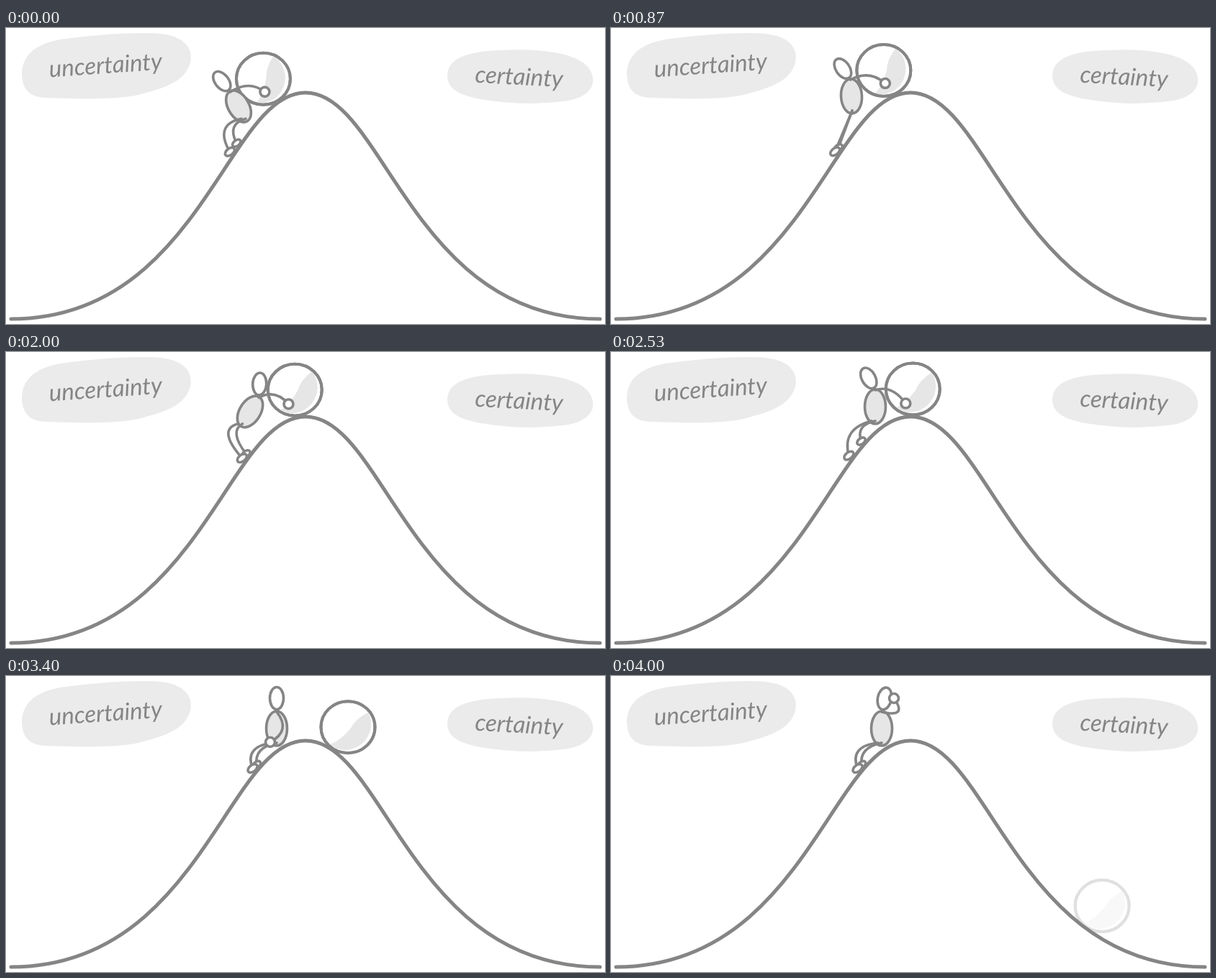
Recreate the animation shown at these times as an HTML page. Size 832 px wide and 412 px high, loop 4.07 s.

```html
<!DOCTYPE html>
<html lang="en">
<head>
<meta charset="utf-8">
<title>Over the hill of uncertainty</title>
<style>
  html, body { margin: 0; width: 100%; height: 100%; overflow: hidden; background: #fff; }
  svg { display: block; width: 832px; height: 412px; }
  text { font: italic 33px Lato, "Open Sans", sans-serif; text-anchor: middle; fill: #858585; }
  .blob { fill: #ebebeb; }
  .line { fill: none; stroke: #858585; stroke-linecap: round; stroke-linejoin: round; }
</style>
</head>
<body>
<svg viewBox="0 0 832 412">
  <path class="blob" d="M22 65C22 40 38 23 75 16C120 10 175 5 215 8C250 12 260 30 256 48C250 72 225 82 195 90C160 102 90 98 55 97C32 96 23 85 22 65Z"/>
  <path class="blob" d="M613 66C614 42 640 32 690 31C730 28 790 32 809 55C823 75 814 94 782 101C745 106 715 106 680 102C640 97 613 90 613 66Z"/>
  <text transform="translate(139 63) rotate(-4)">uncertainty</text>
  <text transform="translate(712 79) rotate(3)">certainty</text>
  <g id="ball" class="line" stroke-width="4"></g>
  <path class="line" stroke-width="5" d="M7 405C269 405 307 90 416 90S563 405 825 405"/>
  <g id="man" class="line" stroke-width="3.6"></g>
</svg>
<script>
const LOOP = 4070, STEP = 66.67, LAST = 60;
const ball = document.getElementById('ball'), man = document.getElementById('man');

// Steps during which the pose is reached, then:
// body x, y, lean, head tilt, near foot, far foot (both along the hill), knee bend
const poses = [
  [0, 0, 323, 109, -30, -38, .344, .314, 30],   // braced
  [0, 4, 317, 117, -30, -40, .37, .345, 28],    // slipping back
  [7, 13, 334, 95, -3, -35, .343, .33, 0],      // stretched
  [13, 20, 347, 93, -25, -21, .289, .266, 31],  // braced higher
  [26, 30, 339, 83, 32, 3, .284, .267, 32],     // squatting
  [30, 34, 353, 72, 22, 0, .285, .275, 2],      // heaving
  [34, 38, 367, 76, 0, -29, .275, .217, 26],    // last push
  [38, 46, 376, 73, 0, 0, .232, .215, 26]       // sitting
];

function ease(f, from, to) {
  const p = Math.max(0, Math.min(1, (f - from) / (to - from)));
  return p * p * (3 - 2 * p);
}
const mix = (a, b, p) => a.map((v, i) => v + (b[i] - v) * p);

function poseAt(f) {
  return poses.slice(1).reduce((now, [from, to, ...next]) => mix(now, next, ease(f, from, to)), poses[0].slice(2));
}

// Point lifted off the hill: u runs from -1 (left end) over 0 (top) to 1
function hill(u, lift) {
  const t = Math.abs(u), s = 1 - t, side = Math.sign(u);
  const run = 3 * s * s * t * 109 + 3 * s * t * t * 147 + t ** 3 * 409;
  const drop = 315 * t * t * (3 - 2 * t);
  const dx = 3 * (s * s * 109 + 2 * s * t * 38 + t * t * 262), dy = 1890 * t * s;
  const k = lift / Math.hypot(dx, dy);
  return [416 + side * (run + k * dy), 90 + drop - k * dx];
}

// Slip, two heaves, a nudge over the top, then free roll
const ballPlace = f => -.12 - .013 * ease(f, 0, 4) + .073 * ease(f, 7, 15) + .009 * ease(f, 13, 20)
  + .057 * ease(f, 26, 35) + .025 * ease(f, 38, 46) + .0036 * Math.max(0, f - 46) ** 2;

const oval = (x, y, rx, ry, turn = 0, fill = '#fff') =>
  `<ellipse rx="${rx}" ry="${ry}" fill="${fill}" transform="translate(${x} ${y}) rotate(${turn})"/>`;

// Curve between two points, bowed by an offset from their middle
const limb = (x, y, u, v, dx, dy) =>
  `<path d="M${x} ${y}Q${(x + u) / 2 + dx} ${(y + v) / 2 + dy} ${u} ${v}"/>`;

function draw(f) {
  const [bx, by] = hill(ballPlace(f), 38.5);
  ball.setAttribute('opacity', 1 - .75 * ease(f, 58, 60));
  ball.innerHTML = oval(bx, by, 37.5, 36) +
    `<path fill="#e6e6e6" stroke="none" transform="translate(${bx} ${by}) rotate(${30 * ease(f, 0, 51)})"
      d="M14 -32Q3 -15 4 0Q0 22 -10 34A36 36 0 0 0 14 -32"/>` +
    oval(bx, by, 37.5, 36, 0, 'none');

  const [x, y, lean, tilt, near, far, bend] = poseAt(f);
  const r = lean * Math.PI / 180, s = Math.sin(r), c = Math.cos(r);
  const hipX = x - 20 * s, hipY = y + 20 * c;
  const neckX = x + 23 * s, neckY = y - 23 * c;
  const turn = tilt + 12 * ease(f, 51, 60), h = turn * Math.PI / 180;
  const [nx, ny] = hill(-near, 7), [fx, fy] = hill(-far, 6);

  // Hand: on the ball, then the knee, then the face
  const grip = ease(f, 26, 31), rest = ease(f, 43, 51), peer = ease(f, 52, 60);
  const onBall = [bx + 2 - 12 * grip, by + 18 + 2 * grip, 2, -17];
  const [ax, ay, ex, ey] = mix(mix(onBall, [367, 92, 25, 5], rest), [393, 31, 28, 18], peer);

  man.innerHTML =
    oval(neckX + 19 * Math.sin(h), neckY - 19 * Math.cos(h), 9.5, 15.5, turn) +
    oval(x, y, 14.5, 24, lean, '#e6e6e6') +
    limb(hipX, hipY, fx, fy, -bend * .67, -bend * .33) +
    limb(hipX - bend * .2, hipY, nx, ny, -bend, -bend / 2) +
    oval(fx, fy, 6.5, 4, -38) +
    oval(nx, ny, 7.5, 4.5, -38) +
    limb(neckX, neckY, ax, ay, ex, ey) +
    oval(ax, ay, 6.5, 6.5);
}

function tick(now) {
  draw(Math.min(LAST, Math.floor((now % LOOP + 4) / STEP)));
  requestAnimationFrame(tick);
}
draw(0);
requestAnimationFrame(tick);
</script>
</body>
</html>
```
